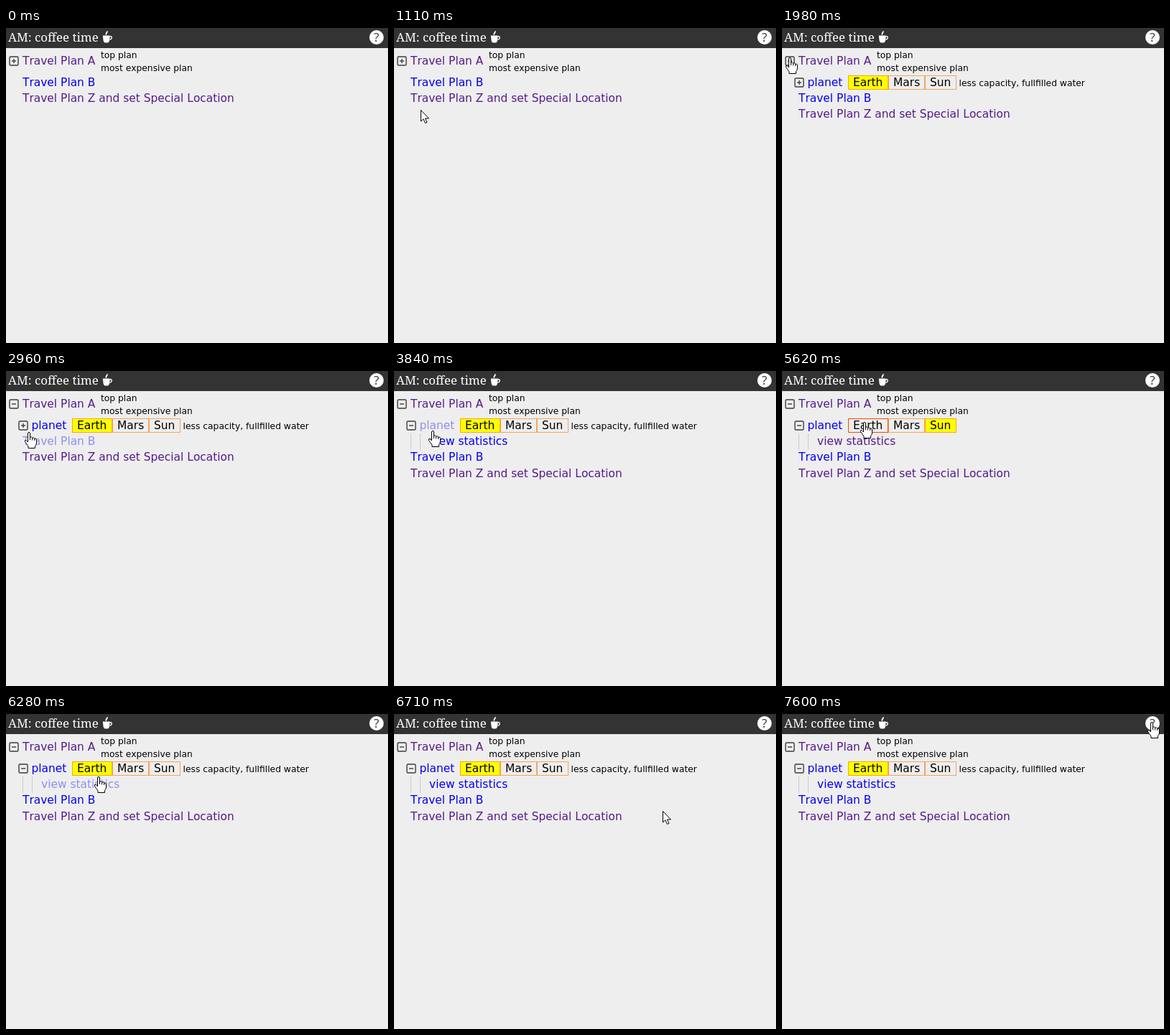
An HTML page with a canvas for the animation above (8 s loop, 532 by 439 pixels).

```html
<!DOCTYPE html>
<html lang="en">
<head>
<meta charset="utf-8">
<title>Travel plans</title>
<style>
html, body { margin: 0; width: 100%; height: 100%; overflow: hidden; background: #eee; }
canvas { display: block; width: 532px; height: 439px; }
</style>
</head>
<body>
<canvas id="stage" width="532" height="439"></canvas>
<script>
const ctx = document.getElementById('stage').getContext('2d');
const LOOP = 8000, STEP = 110;
const BLUE = '#0000ee', VISITED = '#551a8b', DARK = '#333';
const SANS = '"DejaVu Sans", Verdana, sans-serif';
const BIG = '15.45px ' + SANS, SMALL = '12.3px ' + SANS;

// Each move eases along a bent path from where the last one ended.
const entry = { x: 430, y: 422 };
const moves = [
  { start: 330, steps: 8, bend: { x: 160, y: 170 }, to: { x: 37, y: 114 } },
  { start: 1210, steps: 5, bend: { x: 10, y: 108 }, to: { x: 12, y: 41 } },
  { start: 2620, steps: 6, bend: { x: 48, y: 108 }, to: { x: 25, y: 75 } },
  { start: 3720, steps: 7, bend: { x: 100, y: 98 }, to: { x: 189, y: 80 } },
  { start: 4730, steps: 4, bend: { x: 205, y: 92 }, to: { x: 224, y: 84 } },
  { start: 5390, steps: 5, bend: { x: 90, y: 65 }, to: { x: 112, y: 74 } },
  { start: 6270, steps: 6, bend: { x: 229, y: 169 }, to: { x: 399, y: 130 } },
  { start: 7040, steps: 6, bend: { x: 530, y: 70 }, to: { x: 516, y: 11 } }
];

const smooth = u => u * u * (3 - 2 * u);
const bezier = (a, b, c, u) => (1 - u) * (1 - u) * a + 2 * u * (1 - u) * b + u * u * c;

function pointerAt(t) {
  const i = moves.findLastIndex(m => t >= m.start);
  if (i < 0) return null;
  const { start, steps, bend, to } = moves[i];
  const from = i ? moves[i - 1].to : entry;
  const step = Math.floor((t - start) / STEP) + 1;
  const u = smooth(Math.min(step / steps, 1));
  return { x: bezier(from.x, bend.x, to.x, u), y: bezier(from.y, bend.y, to.y, u) };
}

function stateAt(t) {
  return {
    planOpen: t >= 1980,
    planetOpen: t >= 3390,
    tab: t < 4620 || t >= 6160 ? 'Earth' : t < 5280 ? 'Mars' : 'Sun'
  };
}

const tabs = [
  { name: 'Earth', x: 92, w: 56 },
  { name: 'Mars', x: 148, w: 51 },
  { name: 'Sun', x: 199, w: 44 }
];

function text(str, x, y, font, color) {
  ctx.font = font;
  ctx.fillStyle = color;
  ctx.fillText(str, x, y);
}

function line(x1, y1, x2, y2) {
  ctx.beginPath();
  ctx.moveTo(x1, y1);
  ctx.lineTo(x2, y2);
  ctx.stroke();
}

const mug = new Path2D('M134.8 10.5H144.8L144.2 16C144 19 142.8 20.5 141.2 20.5H138.4C136.8 20.5 135.6 19 135.4 16Z');
const mugHandle = new Path2D('M144.5 11.8H146C148 11.8 147.8 16 144.3 16.4');
const steam = new Path2D('M140.5 4.5C142.5 6 137.8 7.2 139.6 9.6');

function drawCup() {
  ctx.fillStyle = ctx.strokeStyle = '#fff';
  ctx.fill(mug);
  ctx.lineWidth = 1.4;
  ctx.stroke(mugHandle);
  ctx.lineWidth = 1.8;
  ctx.stroke(steam);
}

function drawHeader() {
  ctx.fillStyle = DARK;
  ctx.fillRect(0, 0, 532, 28);
  text('AM: coffee time', 3, 19, '16.9px "Noto Serif", serif', '#fff');
  drawCup();
  ctx.fillStyle = '#fff';
  ctx.beginPath();
  ctx.arc(516, 13, 10, 0, Math.PI * 2);
  ctx.fill();
  ctx.textAlign = 'center';
  text('?', 516, 19, '17px "Open Sans", sans-serif', DARK);
  ctx.textAlign = 'left';
}

function drawToggle(x, y, open) {
  ctx.strokeStyle = '#3c3c3c';
  ctx.lineWidth = 1.4;
  ctx.beginPath();
  ctx.roundRect(x - 6, y - 6, 12, 12, 1.6);
  ctx.stroke();
  line(x - 3, y, x + 3, y);
  if (!open) line(x, y - 3, x, y + 3);
}

function drawTab(tab, selected, hovered) {
  if (selected) {
    ctx.fillStyle = '#ff0';
    ctx.fillRect(tab.x, 66, tab.w, 20);
  }
  ctx.strokeStyle = hovered ? '#ff4500' : selected ? '#ffa500' : '#f4a460';
  ctx.lineWidth = 1;
  ctx.strokeRect(tab.x + .5, 66.5, tab.w - 1, 19);
  text(tab.name, tab.x + 7, 81, BIG, '#000');
}

const arrow = new Path2D('M.5 .5V16L4 12.8L6.5 18.5L9 17.5L6.5 12H11.5Z');
const hand = new Path2D('M-2.5 2Q-2.5 .5-1 .5Q.5 .5 .5 2V7Q2.6 6.4 3.6 8Q5.6 7.3 6.7 9Q9.5 8.7 9.5 11V15Q9.3 18 7.5 19.5V22.5H-2V20Q-4.5 16.5-6.5 13.5Q-7 10.8-5 11.5L-2.5 14Z');
const knuckles = new Path2D('M.5 7V11M3.6 8V11.5M6.7 9V12');

function drawPointer({ x, y }, overControl) {
  ctx.save();
  ctx.translate(Math.round(x), Math.round(y));
  ctx.fillStyle = '#fff';
  ctx.strokeStyle = '#000';
  ctx.lineWidth = 1;
  const shape = overControl ? hand : arrow;
  ctx.fill(shape);
  ctx.stroke(shape);
  if (overControl) ctx.stroke(knuckles);
  ctx.restore();
}

function draw(t) {
  const { planOpen, planetOpen, tab } = stateAt(t);
  const pointer = pointerAt(t);
  let overControl = false;

  const hover = (x, y, w, h) => {
    if (!pointer) return false;
    const px = pointer.x, py = pointer.y + 1;
    const hit = px >= x && px < x + w && py >= y && py < y + h;
    overControl = overControl || hit;
    return hit;
  };
  const link = (str, x, y, color) => {
    ctx.font = BIG;
    const over = hover(x, y - 17, ctx.measureText(str).width, 22);
    ctx.globalAlpha = over ? .4 : 1;
    text(str, x, y, BIG, color);
    ctx.globalAlpha = 1;
  };
  const toggle = (x, y, open) => {
    hover(x - 7, y - 7, 14, 14);
    drawToggle(x, y, open);
  };

  ctx.fillStyle = '#eee';
  ctx.fillRect(0, 0, 532, 439);
  drawHeader();
  hover(506, 3, 20, 20);

  toggle(11, 46, planOpen);
  link('Travel Plan A', 23, 51, VISITED);
  text('top plan', 132, 42, SMALL, '#000');
  text('most expensive plan', 132, 60, SMALL, '#000');

  if (planOpen) {
    toggle(24, 76, planetOpen);
    link('planet', 35.5, 81, tab === 'Mars' ? VISITED : BLUE);
    const over = tabs.map(b => hover(b.x, 66, b.w, 20));
    for (const top of [false, true]) {
      tabs.forEach((b, i) => { if (over[i] === top) drawTab(b, b.name === tab, top); });
    }
    if (tab === 'Earth') text('less capacity, fullfilled water', 246.6, 81, SMALL, '#000');
  }
  if (planetOpen) {
    ctx.strokeStyle = '#ccc';
    ctx.lineWidth = 1;
    line(23.5, 87, 23.5, 110);
    line(36.5, 87, 36.5, 110);
    link('view statistics', 49, 103, tab === 'Earth' ? BLUE : VISITED);
  }
  const y = planetOpen ? 125 : planOpen ? 103 : 81;
  link('Travel Plan B', 23, y, BLUE);
  link('Travel Plan Z and set Special Location', 23, y + (planetOpen ? 23 : 22), VISITED);

  if (pointer) drawPointer(pointer, overControl);
}

ctx.fontKerning = 'none';
const begin = performance.now();
function tick() {
  draw((performance.now() - begin) % LOOP);
  requestAnimationFrame(tick);
}
tick();
</script>
</body>
</html>
```
